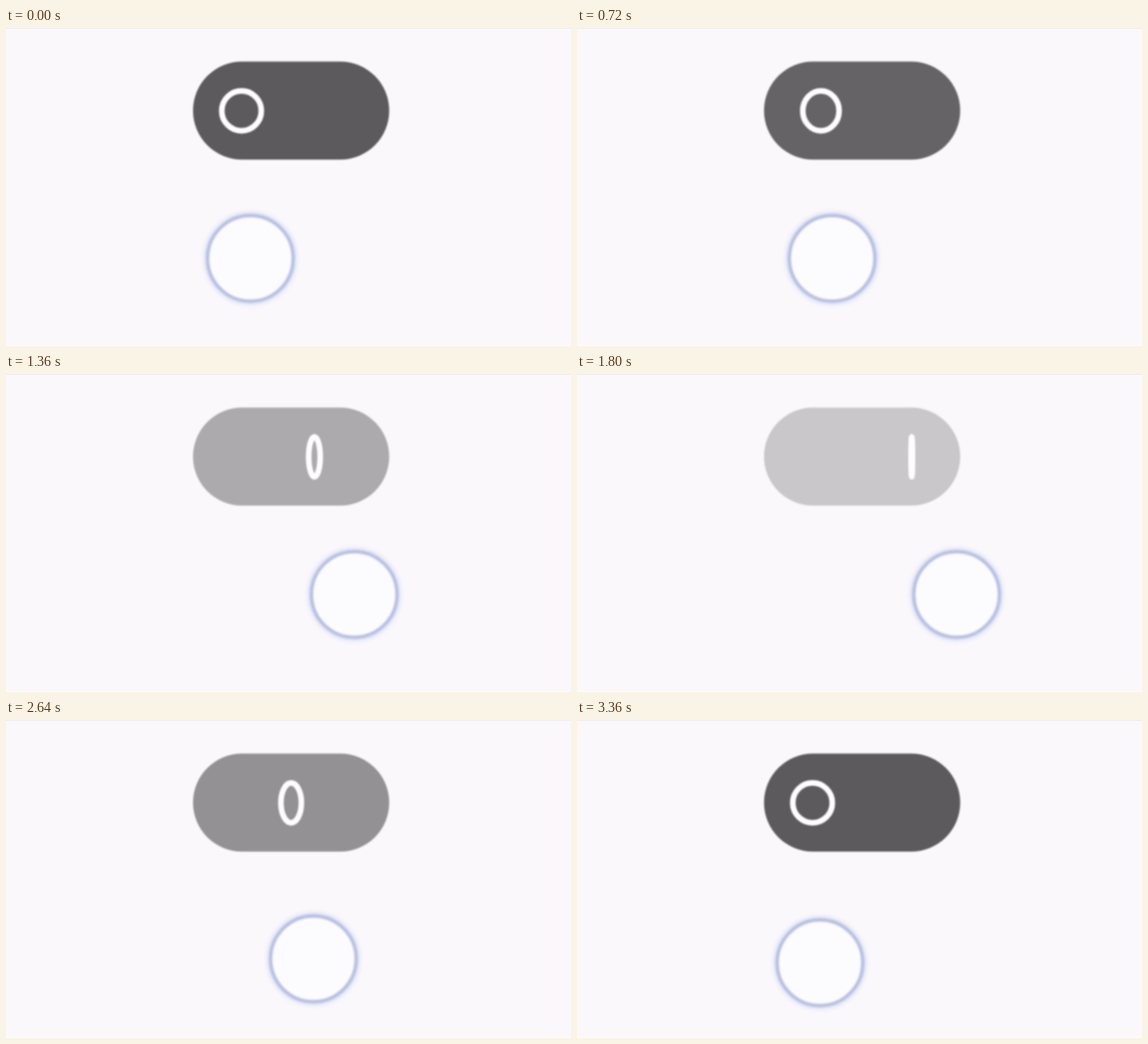
Write an HTML page that moves like this. It is 800 px wide and 450 px high and loops after 3.4 s.

```html
<!DOCTYPE html>
<html lang="en">
<head>
<meta charset="utf-8">
<title>Toggle drag</title>
<style>
  html, body { margin: 0; width: 100%; height: 100%; overflow: hidden; background: #faf8fb; }
  svg { display: block; width: 800px; height: 450px; }
  .glow { fill: none; stroke: #d3dbf4; stroke-width: 7; filter: blur(3px); }
  .rim { fill: #fcfbfe; stroke: #b6bde0; stroke-width: 4.5; filter: blur(1.5px); }
  #knob { fill: none; stroke: #fdfcfe; stroke-width: 8; filter: blur(.8px); }
  #track { filter: blur(.9px); }
</style>
</head>
<body>
<svg viewBox="0 0 800 450">
  <rect width="800" height="1" fill="#ebe9ed"/>
  <rect y="449" width="800" height="1" fill="#fefefe"/>
  <rect id="track" x="264.8" y="47.5" width="277.8" height="138.8" rx="69.4"/>
  <ellipse id="knob" cy="117.2" ry="28.2"/>
  <g id="pointer">
    <circle class="glow" r="61.5"/>
    <circle class="rim" r="60.5"/>
  </g>
</svg>
<script>
const LOOP = 3400, STEP = 40;

const lerp = (a, b, u) => a + (b - a) * u;

// Smoothstep from 0 to 1; power > 1 starts later, power < 1 starts sooner.
function ease(t, from, to, power = 1) {
  const u = Math.min(1, Math.max(0, (t - from) / (to - from))) ** power;
  return u * u * (3 - 2 * u);
}

const [track, knob, pointer] = ['track', 'knob', 'pointer'].map(id => document.getElementById(id));

function draw(now) {
  const t = Math.floor(now % LOOP / STEP) * STEP;

  // The pointer drags right, rests, then drags back while sinking.
  const x = lerp(lerp(346, 537.5, ease(t, 360, 1680, 1.35)), 344, ease(t, 2000, 3360, .87));
  const y = lerp(lerp(326, 312, ease(t, 720, 1080)), 343.5, ease(t, 2000, 3360, .41));
  pointer.setAttribute('transform', `translate(${x} ${y})`);

  // The toggle follows a little behind.
  const on = ease(t, 360, 1740, 1.28) - ease(t, 2060, 3220);
  const grey = lerp(92, 201, on);
  track.setAttribute('fill', `rgb(${grey}, ${grey - 2}, ${grey + 1})`);
  knob.setAttribute('cx', lerp(333.5, 474, on));
  knob.setAttribute('rx', lerp(28, 1, on));
}

const start = performance.now();
(function frame() {
  draw(performance.now() - start);
  requestAnimationFrame(frame);
})();
</script>
</body>
</html>
```
